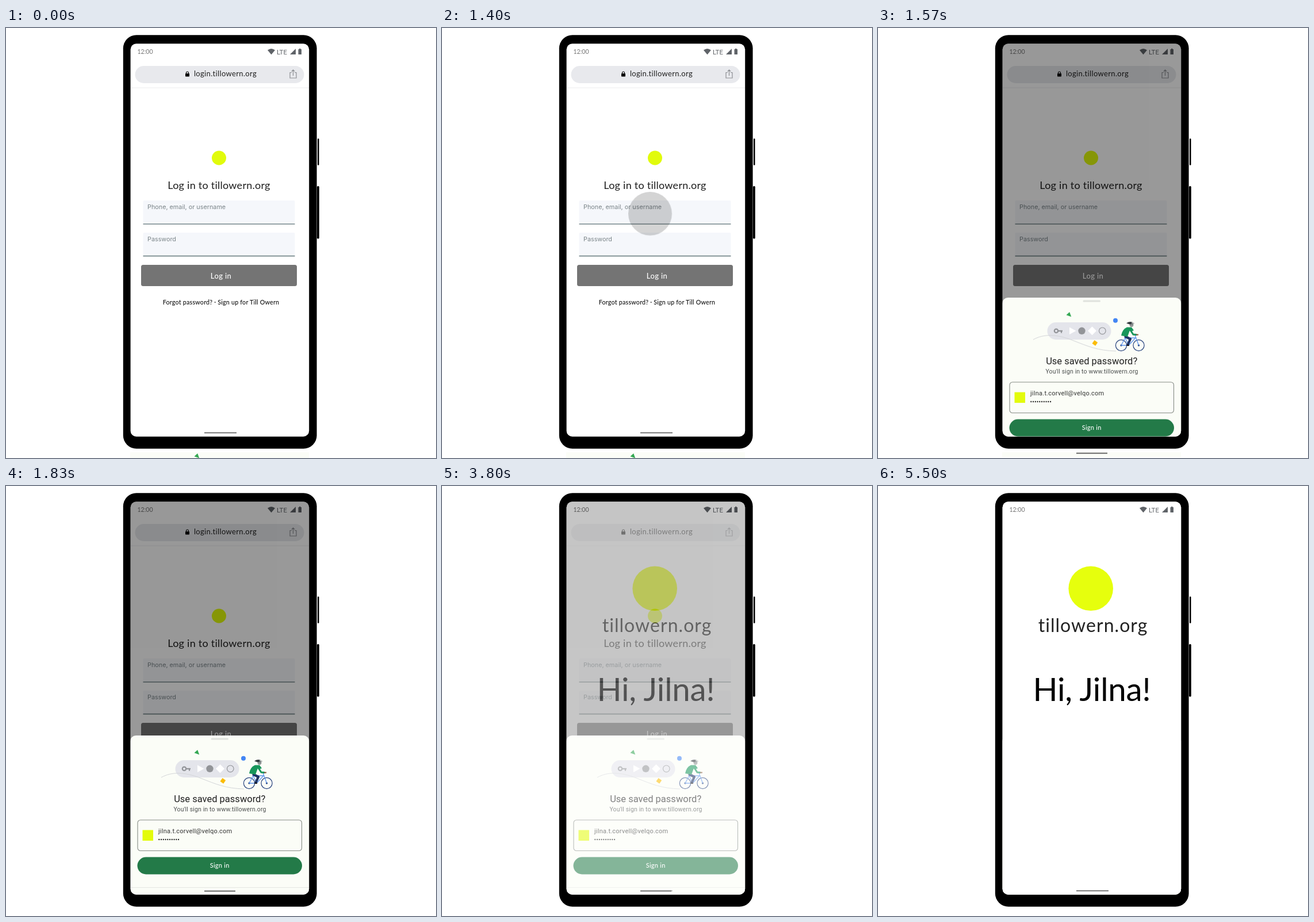
Write an HTML page that moves like this. It is 748x748 px and loops after 5.53 s.

```html
<!DOCTYPE html>
<html lang="en">
<head>
<meta charset="utf-8">
<title>Saved password sign-in</title>
<style>
  html, body { margin: 0; width: 100%; height: 100%; overflow: hidden; background: #fff; }
  svg { display: block; width: 748px; height: 748px; }
  text { font-family: Lato, sans-serif; fill: #1f1f1f; }
  .mid { text-anchor: middle; }
  .label { font: 10.8px Inter, sans-serif; fill: #7b8589; }
  .plain { font-family: Roboto, sans-serif; }

  .tap, .scrim, .sheet, .welcome { animation: 5530ms linear infinite both; }
  .tap { transform-box: fill-box; transform-origin: center; }
  .tap.field { animation-name: tap-field; }
  .tap.confirm { animation-name: tap-confirm; }
  .scrim { animation-name: dim; }
  .sheet { animation-name: rise; }
  .welcome { animation-name: greet; }

  @keyframes tap-field {
    0%, 21.7% { opacity: 0; transform: scale(.4); }
    24.77%, 25.32% { opacity: .17; transform: scale(1); }
    26.58% { opacity: .07; transform: scale(1.03); }
    27.49%, 100% { opacity: 0; transform: scale(1.05); }
  }
  @keyframes tap-confirm {
    0%, 59.31% { opacity: 0; transform: scale(.4); }
    60.94% { opacity: .1; transform: scale(.66); }
    62.93%, 63.65% { opacity: .17; transform: scale(1); }
    65.8%, 100% { opacity: 0; transform: scale(1.05); }
  }
  @keyframes dim {
    0%, 25.32% { opacity: 0; }
    26.58% { opacity: .3; }
    27.12%, 100% { opacity: .4; }
  }
  @keyframes rise {
    0%, 26.7% { transform: translateY(281px); animation-timing-function: cubic-bezier(.25, .5, .3, 1); }
    30%, 100% { transform: translateY(0); }
  }
  @keyframes greet {
    0%, 65.1% { opacity: 0; }
    73.24%, 100% { opacity: 1; }
  }
</style>
</head>
<body>
<svg viewBox="0 0 748 748">
  <defs>
    <rect id="screen" x="216.6" y="27.2" width="310.6" height="683.6" rx="10"/>
    <clipPath id="window">
      <use href="#screen"/>
      <rect x="216" y="738" width="311" height="10"/>
    </clipPath>
    <g id="status">
      <text x="228.5" y="45" font-size="10.5" style="fill:#757575">12:00</text>
      <text class="plain" x="471" y="45.7" font-size="11.4" style="fill:#5f6368">LTE</text>
      <g fill="#5f6368">
        <path d="M455 38.6Q461.5 33.6 468 38.6L461.5 46.2Z"/>
        <path d="M504 36V46H494Z"/>
        <path d="M508.5 37H510V35.7H512.5V37H514V46H508.5Z"/>
      </g>
    </g>
    <path id="home" d="M345 704.2H401" stroke="#555" stroke-width="1.6"/>
    <g id="wheel" fill="none" stroke="#24407c" stroke-width="1.2">
      <circle r="9.6"/>
      <circle r="1" fill="#24407c"/>
    </g>
  </defs>

  <!-- phone body -->
  <rect x="203.8" y="12.2" width="336.8" height="719.6" rx="23"/>
  <rect x="542" y="192.3" width="2.5" height="46.5" rx="1.2"/>
  <rect x="541" y="275" width="3.8" height="91.5" rx="1.6"/>
  <use href="#screen" fill="#fff"/>

  <!-- login page -->
  <use href="#status"/>
  <rect x="224.5" y="66" width="294" height="30" rx="15" fill="#e8e9ed"/>
  <rect x="312" y="79" width="7" height="5.6" rx=".8"/>
  <path d="M313.5 79.5V78a2 2 0 0 1 4 0V79.5" fill="none" stroke="#000" stroke-width="1.1"/>
  <text class="mid" x="381.5" y="84.3" font-size="13" letter-spacing=".35">login.tillowern.org</text>
  <path d="M497 77.5H494V87H505V77.5H502M499.5 83V73M496.7 75.6L499.5 72.8L502.3 75.6" fill="none" stroke="#8d8f93" stroke-width="1.2"/>
  <path d="M217 104H527" stroke="#ececee"/>

  <circle cx="370.5" cy="226" r="12.5" fill="#e1fb0c"/>
  <text class="mid" x="370.5" y="279.7" font-size="18" letter-spacing=".25">Log in to tillowern.org</text>

  <g fill="#f5f7fb">
    <rect x="238.5" y="300" width="264" height="41" rx="2"/>
    <rect x="238.5" y="356" width="264" height="41" rx="2"/>
  </g>
  <path d="M238.5 341H502.5M238.5 396.6H502.5" stroke="#75878a" stroke-width="1.7"/>
  <text class="label" x="246" y="315.3">Phone, email, or username</text>
  <text class="label" x="246" y="371.3">Password</text>

  <rect x="235" y="412" width="271" height="37" rx="3.5" fill="#747474"/>
  <text class="mid" x="374" y="435.7" font-size="13" font-weight="500" letter-spacing=".4" style="fill:#fff">Log in</text>
  <text class="mid" x="374" y="481" font-size="10.7" font-weight="500" letter-spacing=".22" style="fill:#111">Forgot password? · Sign up for Till Owern</text>
  <use href="#home"/>

  <use class="scrim" href="#screen"/>
  <circle class="tap field" cx="362" cy="323" r="38"/>

  <!-- saved password sheet -->
  <g clip-path="url(#window)">
    <g class="sheet">
      <path d="M216 711V444a10 10 0 0 1 10-10H517.5a10 10 0 0 1 10 10V711Z" fill="#fbfdf7"/>
      <rect x="356.5" y="438.5" width="30.5" height="3" rx="1.5" fill="#dfe2dd"/>

      <rect x="294.5" y="477" width="111" height="30" rx="15" fill="#e4e5eb"/>
      <g fill="none" stroke="#929498" stroke-width="2.2">
        <circle cx="310" cy="491.8" r="3.2"/>
        <path d="M313.5 491.8H321M319 492V495.5"/>
      </g>
      <path d="M333 485.5L344.5 491.8L333 498Z" fill="#fff"/>
      <circle cx="354.5" cy="491.8" r="6.2" fill="#929498"/>
      <path d="M372.5 484.3L380 491.8L372.5 499.3L365 491.8Z" fill="#fff"/>
      <circle cx="390.3" cy="491.8" r="5.8" fill="none" stroke="#929498" stroke-width="1.2"/>
      <path d="M270 507C288 497 310 497 338 508S382 526 414 527" fill="none" stroke="#d3d5d8"/>
      <path d="M333.2 459L336.2 467.3L327.5 464.3Z" fill="#34a853"/>
      <circle cx="413" cy="473.7" r="4" fill="#4285f4"/>
      <path d="M376.5 508L382.2 512L378.2 517.7L372.5 513.7Z" fill="#fbbc04"/>

      <!-- cyclist -->
      <use href="#wheel" x="423" y="517"/>
      <use href="#wheel" x="453.5" y="517"/>
      <path d="M423 517L430 504H448L436 517H423M430 504L436 517M453.5 517L447 499H451" fill="none" stroke="#5b93ee" stroke-width="1.3"/>
      <path d="M429 501L439 506L434 517" fill="none" stroke="#1c3263" stroke-width="4.2" stroke-linejoin="round"/>
      <path d="M432 517H437" stroke="#111" stroke-width="1.8"/>
      <path d="M423 500Q425 489 433 485.5L441 485.5L445 491L441 492.5L438 491L434 502Z" fill="#17965a"/>
      <path d="M438 489L444 498L450 498.5" fill="none" stroke="#17965a" stroke-width="3"/>
      <path d="M449 498.5H453" stroke="#8b5a3c" stroke-width="2"/>
      <circle cx="441" cy="481.5" r="3.4" fill="#8f9494"/>
      <path d="M432 478.5Q440 473.5 446 479L438 480.5Z" fill="#30363b"/>
      <path d="M440 478.5Q444 475 446.5 479.5Z" fill="#c6cac9"/>

      <text class="plain mid" x="371.7" y="549.8" font-size="16.5">Use saved password?</text>
      <text class="plain mid" x="372" y="565.5" font-size="10.5" letter-spacing=".14" style="fill:#4d5050">You'll sign in to www.tillowern.org</text>

      <rect x="229" y="581" width="285.5" height="53.5" rx="5" fill="none" stroke="#858a85" stroke-width="1.1"/>
      <rect x="237.5" y="598.5" width="18.5" height="18.5" fill="#e3fb0c"/>
      <text class="plain" x="265" y="604" font-size="11" letter-spacing=".24" style="fill:#333">jilna.t.corvell@velqo.com</text>
      <path d="M266.3 615H300.5" stroke="#222" stroke-width="2.3" stroke-linecap="round" stroke-dasharray="0 3.75"/>

      <rect x="228.5" y="645.5" width="286.5" height="30" rx="15" fill="#237a48"/>
      <text class="mid" x="371.7" y="664.3" font-size="11" font-weight="500" letter-spacing=".25" style="fill:#fff">Sign in</text>
      <path d="M217 698.5H527" stroke="#e4e7e2"/>
      <path d="M345 704.7H399" stroke="#555" stroke-width="1.7"/>
    </g>
  </g>
  <circle class="tap confirm" cx="372" cy="660" r="38"/>

  <!-- signed-in page -->
  <g class="welcome">
    <use href="#screen" fill="#fff"/>
    <use href="#status"/>
    <circle cx="370.2" cy="178.3" r="38.8" fill="#e6ff0d"/>
    <text class="mid" x="374" y="254" font-size="32" letter-spacing="1.05" style="fill:#222">tillowern.org</text>
    <text class="mid" x="372" y="373.5" font-size="56.5" letter-spacing="-.2" style="fill:#000">Hi, Jilna!</text>
    <use href="#home"/>
  </g>
</svg>
</body>
</html>
```
